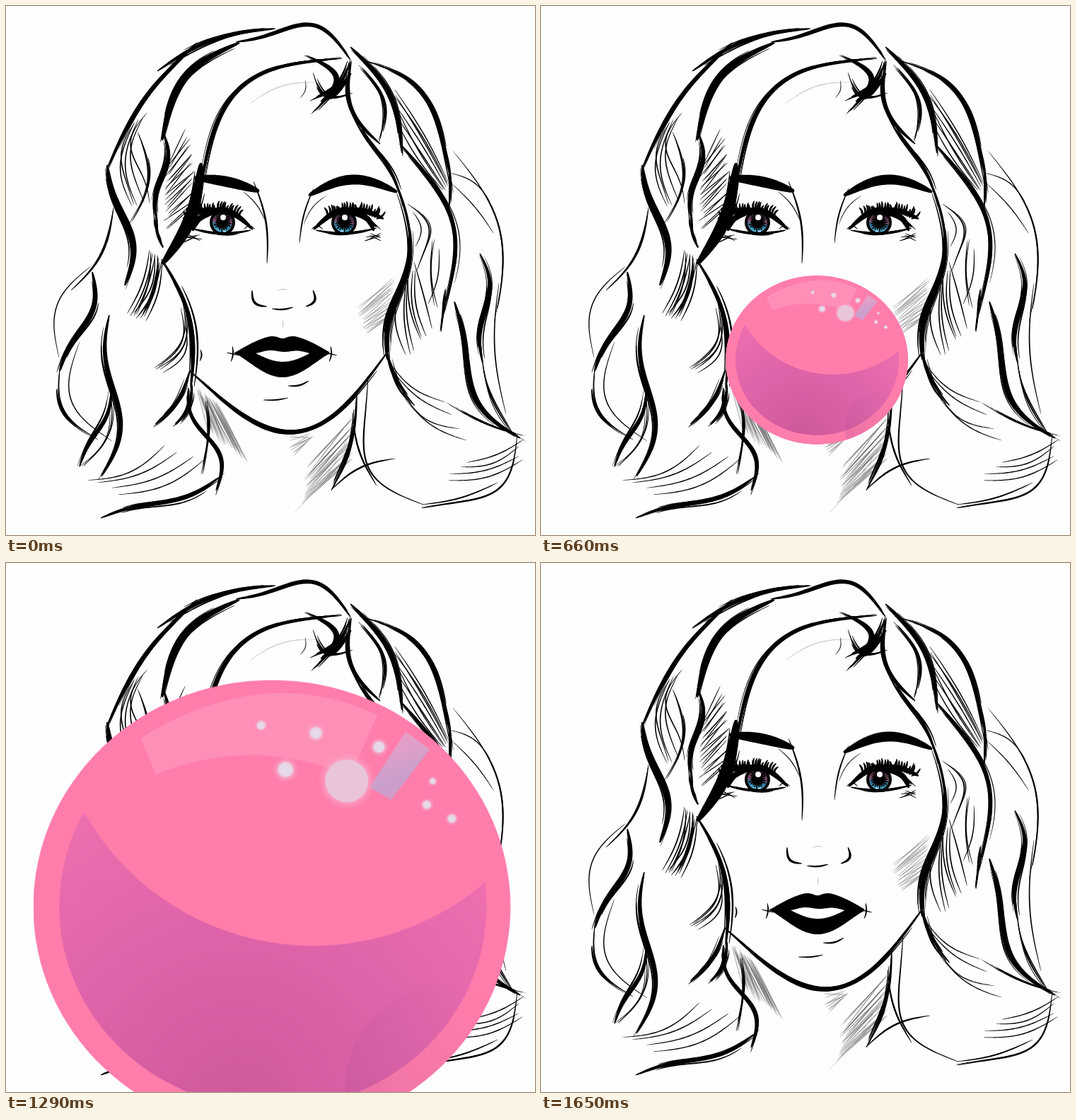
Write an HTML page with a canvas that moves like this. It is 748 by 748 pixels and loops after 1.71 s.

```html
<!DOCTYPE html>
<html lang="en">
<head>
<meta charset="utf-8">
<title>Bubble gum</title>
<style>
html, body { margin: 0; width: 100%; height: 100%; overflow: hidden; background: #fefefe; }
canvas, svg { position: absolute; left: 0; top: 0; width: 748px; height: 748px; }
svg { overflow: hidden; }
#bubble { animation: blow 1710ms infinite; }
/* Each stretch advances in 30 ms steps. */
@keyframes blow {
  0% { transform: translate(398px, 488px) scale(0); animation-timing-function: steps(1); }
  1.7544% { transform: translate(398px, 488px) scale(.025, .02); animation-timing-function: steps(13); }
  24.5614% { transform: translate(393.5px, 493px) scale(.297, .263); animation-timing-function: steps(8); }
  38.5965% { transform: translate(390px, 500.5px) scale(.529, .507); animation-timing-function: steps(9); }
  54.386% { transform: translate(385px, 504.5px) scale(.791, .832); animation-timing-function: steps(8); }
  68.4211% { transform: translate(381px, 485.5px) scale(1, 1); animation-timing-function: steps(9); }
  84.2105% { transform: translate(369.5px, 487px) scale(1.861, 1.813); animation-timing-function: steps(4); }
  91.2281% { transform: translate(364.4px, 487.7px) scale(2.243, 2.174); animation-timing-function: steps(1); }
  96.4912%, 100% { transform: translate(398px, 488px) scale(0); }
}
</style>
</head>
<body>
<canvas id="portrait" width="748" height="748"></canvas>
<svg viewBox="0 0 748 748">
  <defs>
    <radialGradient id="shade" gradientUnits="userSpaceOnUse" cx="345" cy="690" r="350">
      <stop offset="0" stop-color="#cf599b"/>
      <stop offset=".55" stop-color="#e064a9"/>
      <stop offset="1" stop-color="#ee70b0"/>
    </radialGradient>
    <linearGradient id="spot" x1="0" y1=".7" x2=".8" y2=".2">
      <stop offset="0" stop-color="#a84c92" stop-opacity=".25"/>
      <stop offset="1" stop-color="#c060a0" stop-opacity="0"/>
    </linearGradient>
    <linearGradient id="pane" x1=".3" y1="0" x2=".6" y2="1">
      <stop offset="0" stop-color="#f09fc6"/>
      <stop offset=".7" stop-color="#c99fcb"/>
      <stop offset="1" stop-color="#d99ac6"/>
    </linearGradient>
    <radialGradient id="glow">
      <stop offset="0" stop-color="#e4dcec"/>
      <stop offset=".5" stop-color="#e8d5e6"/>
      <stop offset=".62" stop-color="#f3b4d0" stop-opacity=".6"/>
      <stop offset="1" stop-color="#ff9dc0" stop-opacity="0"/>
    </radialGradient>
    <radialGradient id="halo">
      <stop offset=".6" stop-color="#f5c0d8" stop-opacity=".9"/>
      <stop offset="1" stop-color="#ff9dc0" stop-opacity="0"/>
    </radialGradient>
    <clipPath id="skin"><ellipse cx="381" cy="485.5" rx="244" ry="235.5"/></clipPath>
  </defs>
  <g id="bubble"><g transform="translate(-381 -485.5)">
    <ellipse cx="381" cy="485.5" rx="244" ry="235.5" fill="#ff7dab"/>
    <path d="M189 387A267 267 0 0 0 599 460A218.5 210 0 1 1 189 387Z" fill="url(#shade)"/>
    <circle cx="560" cy="672" r="104" fill="url(#spot)" clip-path="url(#skin)"/>
    <path d="M247 310Q372 231 489 286L461 350Q362 307 262 348Z" fill="#fff" opacity=".14"/>
    <path d="M518 303.5L542.5 322L503 374.5L481 361Z" fill="url(#pane)"/>
    <circle cx="457.6" cy="354.8" r="30" fill="url(#halo)"/>
    <circle cx="457.6" cy="354.8" r="22" fill="#e9c5db"/>
    <g fill="url(#glow)">
      <circle cx="370" cy="297" r="7.5"/><circle cx="426" cy="305" r="11"/>
      <circle cx="490.5" cy="319.5" r="10.5"/><circle cx="395" cy="343" r="14"/>
      <circle cx="545.5" cy="355" r="5.5"/><circle cx="539.5" cy="379.5" r="7.5"/>
      <circle cx="565" cy="394" r="7.5"/>
    </g>
  </g></g>
</svg>
<script>
const ctx = document.getElementById('portrait').getContext('2d');
let seed = 11;
const rnd = () => (seed = (seed * 16807) % 2147483647) / 2147483647;
const jitter = size => (rnd() - .5) * size;
const lerp = (a, b, u) => a + (b - a) * u;

function fill(points, color) {
  ctx.fillStyle = color;
  ctx.beginPath();
  points.forEach(p => ctx.lineTo(...p));
  ctx.closePath();
  ctx.fill();
}

// A strand runs between two ends; bow bends it to one side, swing into an S.
function pointOn([x0, y0, x1, y1, bow = 0, swing = 0], u) {
  const dx = x1 - x0, dy = y1 - y0, length = Math.hypot(dx, dy);
  const side = (bow * Math.sin(Math.PI * u) + swing * Math.sin(2 * Math.PI * u)) / length;
  return [x0 + dx * u - dy * side, y0 + dy * u + dx * side];
}

// A brush stroke over part of a strand, tapered at both ends.
function stroke(width, strand, color = '#000', from = 0, to = 1) {
  const left = [], right = [], steps = 40;
  for (let i = 0; i <= steps; i++) {
    const u = lerp(from, to, i / steps);
    const [x, y] = pointOn(strand, u);
    const [ax, ay] = pointOn(strand, u - .01), [bx, by] = pointOn(strand, u + .01);
    const half = width / 2 * (.2 + .8 * Math.sin(Math.PI * i / steps) ** .6);
    const size = half / Math.hypot(bx - ax, by - ay);
    const nx = (by - ay) * size, ny = (ax - bx) * size;
    left.push([x + nx, y + ny]);
    right.unshift([x - nx, y - ny]);
  }
  fill([...left, ...right], color);
}

// A main stroke with loose wisps drawn along it.
function sketch(width, wisps, ...strand) {
  stroke(width, strand);
  const spread = 3 + width * .4;
  for (let i = 0; i < wisps; i++) {
    const [x0, y0, x1, y1, bow = 0, swing = 0] = strand;
    const shift = jitter(spread);
    const loose = [x0 + shift + jitter(spread), y0 + jitter(spread),
      x1 + shift + jitter(spread), y1 + jitter(spread), bow + jitter(spread), swing + jitter(3)];
    stroke(1 + 1.6 * rnd(), loose, '#000', rnd() * .3, 1.05 - rnd() * .3);
  }
}

// Thin strands blended from strand a to strand b.
function flow(n, width, color, a, b) {
  for (let i = 0; i < n; i++) {
    const u = (i + rnd()) / n;
    stroke(width, a.map((v, k) => lerp(v, b[k], u) + jitter(8)), color);
  }
}

// A pointed lens whose halves rise and fall by their own formulas.
function lens(color, x0, x1, up, down) {
  const rim = [];
  for (let u = 0; u <= 1; u += .02) {
    rim.push([lerp(x0, x1, u), 491 - up(u, Math.sin(Math.PI * u))]);
    rim.unshift([lerp(x0, x1, u), 491 + down(u, Math.sin(Math.PI * u))]);
  }
  fill(rim, color);
}

function disc(x, y, r, color) {
  ctx.fillStyle = color;
  ctx.beginPath();
  ctx.arc(x, y, r, 0, 7);
  ctx.fill();
}

function eye(x, side) {
  ctx.save();
  ctx.translate(x, 306);
  ctx.scale(side, 1);
  disc(0, 0, 18, '#000');
  const iris = ctx.createLinearGradient(0, -14, -side * 4, 15);
  iris.addColorStop(.1, '#1c1420');
  iris.addColorStop(.45, '#84506e');
  iris.addColorStop(.6, '#2f6f90');
  iris.addColorStop(1, '#58c6e8');
  disc(0, 0, 14, iris);
  for (let a = 0; a < 6.28; a += .3) {
    const r = 10 + 4 * rnd(), c = Math.cos(a), s = Math.sin(a);
    stroke(2, [6 * c, 6 * s, r * c, r * s]);
  }
  disc(0, 0, 8, '#000');
  disc(side, -7, 4, '#fff');
  disc(-3, 14, 2, '#fff');
  sketch(9, 3, -43, 10, 46, 6, -25);
  stroke(8, [-5, -16, 56, -5, -6]);
  stroke(8, [18, -14, 42, 12, -5]);
  sketch(4, 2, -40, 11, 46, 8, 6);
  stroke(1.5, [-46, 10, -30, 10, -5]);
  for (let u = 0; u < 1; u += .045) {
    const px = lerp(-24, 46, u), py = -16 + (px - 8) ** 2 / 125;
    stroke(3, [px, py, px - 4 + 15 * u + jitter(5), py - 9 - rnd() * 6, 2]);
  }
  flow(5, 1.2, '#000', [28, 24, 50, 15], [38, 18, 56, 27]);
  ctx.restore();
}

// Shading
flow(34, 1.2, '#6668', [270, 542, 290, 600], [300, 565, 342, 645]);
flow(9, 1.2, '#888a', [398, 612, 430, 608], [406, 635, 432, 614]);
flow(20, 1.2, '#666b', [488, 578, 430, 650], [488, 645, 418, 704]);
flow(20, 1.2, '#7779', [550, 382, 498, 425], [548, 440, 510, 465]);
stroke(1, [345, 138, 440, 108, -10], '#bbb');
stroke(1, [488, 600, 406, 718, -8], '#bbb');
stroke(1, [384, 403, 398, 402, -2], '#bbb');
stroke(1, [391, 444, 392, 456], '#bbb');

// Crown and left outline
sketch(6, 7, 214, 92, 381, 32, -15);
sketch(6, 2, 325, 51, 487, 76, -36, 10);
sketch(6, 6, 270, 52, 143, 230, 14);
sketch(10, 8, 143, 225, 168, 395, -15, 8);
flow(5, 1.6, '#000', [172, 172, 172, 282, 22, 0], [200, 150, 206, 280, 17, 6]);
sketch(2, 2, 186, 178, 178, 305, -20);
sketch(2.5, 1, 152, 285, 92, 402, -15);
sketch(1.5, 0, 120, 368, 75, 497, 27);

// Fringe
sketch(10, 12, 330, 52, 221, 190, 30);
sketch(6, 9, 222, 178, 214, 305, -3, -7);
sketch(4, 3, 213, 295, 222, 342, 4);
sketch(5, 13, 475, 74, 276, 255, 66);
flow(20, 1.2, '#000', [256, 176, 228, 218], [270, 280, 226, 318]);
sketch(17, 10, 276, 222, 221, 365, -13);

// Left lengths
sketch(6, 6, 220, 358, 261, 540, -20);
flow(12, 1.8, '#000', [203, 345, 174, 435, -8], [224, 365, 200, 442, -5]);
flow(5, 1.6, '#000', [247, 405, 202, 510, -20], [257, 455, 228, 517, -13]);
sketch(4, 9, 260, 515, 211, 591, -8);
sketch(5, 7, 263, 535, 240, 592, -7);
sketch(8, 6, 122, 376, 76, 516, -13, -7);
sketch(2, 3, 77, 505, 130, 613, 25);
sketch(1.5, 0, 104, 475, 150, 615, 37);
sketch(7, 6, 146, 437, 135, 665, -14, 13);
sketch(6, 4, 149, 543, 104, 651, -5, -4);
sketch(1.6, 2, 148, 548, 108, 651, -18);
flow(4, 1.5, '#000', [118, 668, 222, 623, 14], [165, 694, 288, 640, 9]);
sketch(6, 7, 134, 724, 302, 666, 7, -5);

// Neck
sketch(6, 2, 258, 540, 297, 685, -8, 12);
sketch(2, 2, 282, 558, 276, 662, -6);
sketch(4, 5, 496, 548, 460, 685, -10);
sketch(2.5, 0, 490, 575, 524, 678, 8);
sketch(2.5, 0, 460, 684, 550, 640, -10);

// Parting
sketch(2, 16, 422, 70, 438, 148, -38);
sketch(2, 9, 487, 75, 435, 132, -12);
sketch(2, 5, 434, 94, 490, 123, 20);
sketch(6, 4, 488, 95, 445, 135, -4);
stroke(1, [423, 105, 416, 130, -4]);
sketch(7, 7, 487, 58, 560, 208, -20);
sketch(6, 6, 488, 78, 529, 195, 22);
sketch(1.5, 4, 498, 83, 528, 192, -20);
sketch(2.5, 6, 486, 145, 561, 282, -5, 4);

// Right waves
sketch(2.5, 9, 500, 75, 631, 255, -43, -5);
flow(7, 1.5, '#000', [545, 110, 624, 250, -10], [555, 165, 617, 265, 6]);
sketch(6, 9, 557, 195, 621, 421, -41, 2);
sketch(2, 3, 622, 400, 614, 460);
sketch(3, 2, 618, 190, 626, 290, -6);
sketch(1.7, 1, 632, 205, 690, 447, -38);
flow(2, 1.3, '#000', [630, 235, 684, 268, -5], [638, 265, 695, 375, -4]);

// Ear and hair beside the face
sketch(2, 1, 568, 280, 581, 374, -24, -4);
stroke(1.4, [575, 291, 579, 340, -10]);
sketch(3.5, 2, 540, 225, 539, 455, -32);
sketch(9, 11, 571, 315, 539, 500, 1, -7);
flow(7, 1.7, '#000', [563, 390, 560, 500, 12], [580, 365, 606, 455, 3]);
flow(3, 1.5, '#000', [598, 325, 618, 428, 14], [617, 345, 592, 422, -8]);
sketch(2.5, 8, 539, 488, 578, 565, 7);
flow(4, 1.4, '#000', [540, 500, 622, 562, 8], [565, 560, 650, 614, 14]);

// Right lengths
sketch(6, 8, 670, 350, 674, 505, -7, -8);
sketch(1.7, 0, 697, 392, 707, 577, 11);
sketch(8, 12, 634, 418, 727, 611, 28, -9);
sketch(1.6, 3, 672, 480, 718, 607, 12);
sketch(1.4, 2, 622, 560, 730, 607, 6);
sketch(2.5, 1, 723, 605, 588, 710, -43, -7);
flow(4, 1.5, '#000', [731, 609, 656, 636, -4], [726, 646, 616, 676, -12]);
sketch(2.2, 0, 512, 525, 590, 705, 48, -8);
sketch(2, 0, 588, 705, 695, 674, 6);

// Face
sketch(6, 4, 260, 516, 541, 487, 101);
stroke(15, [266, 243, 358, 262, -4]);
stroke(14, [428, 268, 553, 263, -20]);
stroke(2.6, [350, 248, 369, 364, -8]);
stroke(1.2, [335, 262, 367, 305, -4]);
stroke(2, [435, 258, 415, 335, 4]);
stroke(1, [453, 268, 421, 309, 5]);
eye(306, -1);
eye(478, 1);
stroke(3.5, [348, 402, 369, 425, 9]);
stroke(2.5, [376, 428, 406, 426, 2]);
stroke(3.5, [434, 402, 424, 425, -8]);

// Mouth and chin
lens('#000', 322, 460, (u, s) => 26 * s - 5 * Math.exp(-(((u - .5) / .07) ** 2)), (u, s) => 34 * s ** 1.3);
lens('#fefefe', 353, 430, (u, s) => 4 * s + 2 * Math.sin(9 * u) * s, (u, s) => 12 * s);
for (const x of [320, 459]) {
  stroke(2, [x, 481, x - 2, 503, -2]);
  stroke(1.5, [x - 8, 490, x + 9, 494]);
}
stroke(2.5, [399, 537, 428, 530, 3]);
stroke(2, [364, 557, 399, 554, 1.5]);
stroke(2, [275, 486, 274, 502, -2]);
</script>
</body>
</html>
```
